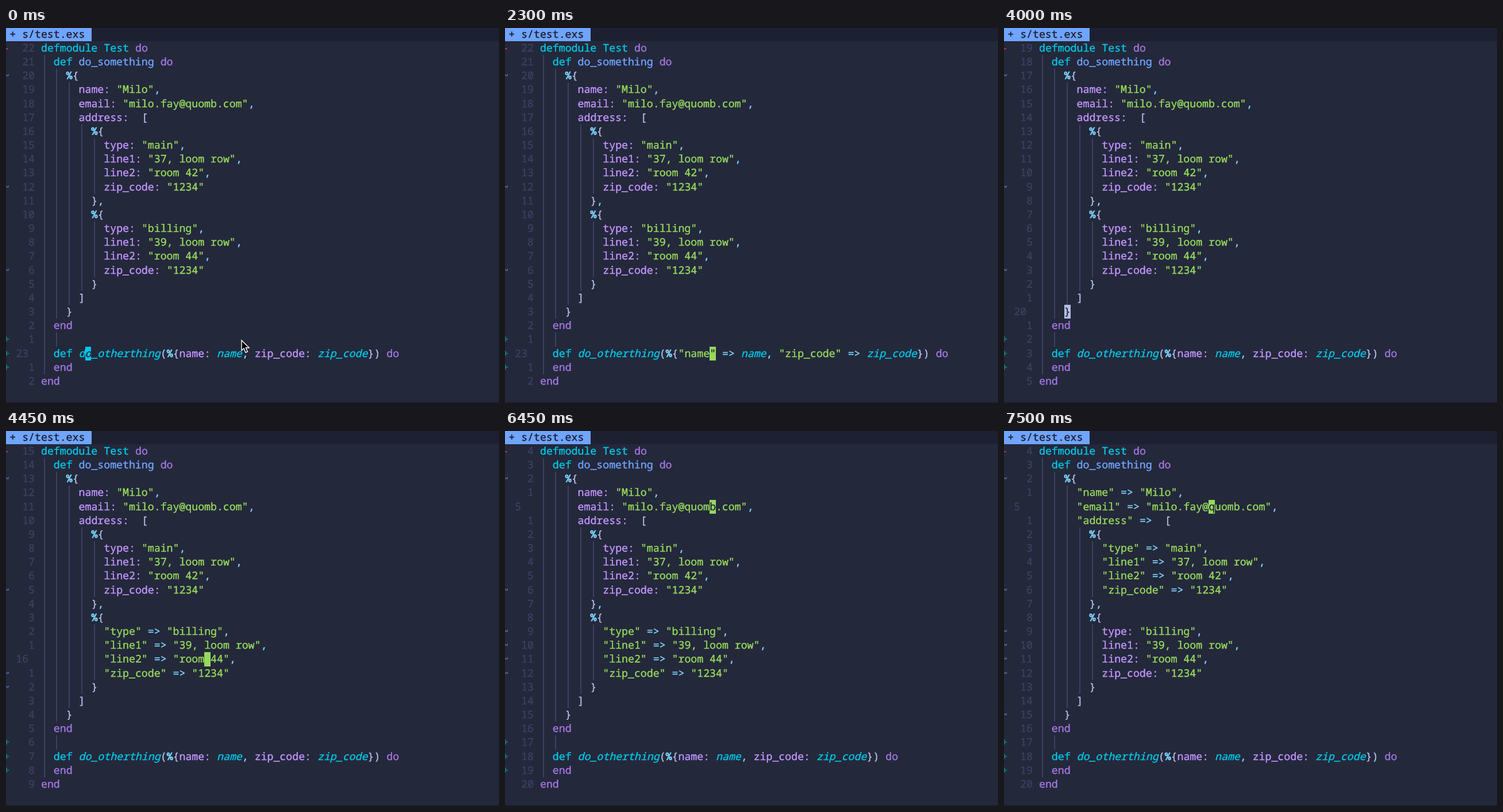
Recreate the animation shown at these times as an HTML page. Size 858x653 px, loop 8 s.

```html
<!DOCTYPE html>
<html lang="en">
<head>
<meta charset="utf-8">
<title>Map key toggle</title>
<style>
  html, body { margin: 0; width: 100%; height: 100%; overflow: hidden; background: #24283b; }
  #stage {
    position: absolute; left: 0; top: 0; width: 858px; height: 653px; overflow: hidden;
    font: 500 18.22px/24.16px "Noto Sans Mono", "DejaVu Sans Mono", monospace;
    text-rendering: geometricPrecision; font-variant-ligatures: none;
    -webkit-text-stroke: 0.4px;
  }
  #stage div { position: absolute; white-space: pre; }
  #bar { left: 0; top: 0; width: 100%; height: 23px; background: #1d2031; }
  #tab { left: 0; top: 0; width: 148.5px; height: 23px; background: #6fa4ff; }
  #foot { left: 0; bottom: 0; width: 100%; height: 2px; background: #1d2031; }
  #title { color: #1d2031; }
  .guide { width: 2px; height: 24.16px; background: #3b4162; }
  .num { color: #3b4162; }
  .add { color: #128079; }
  .mod { color: #4f78b0; }
  .del { color: #b9474f; }
  .def { color: #00c8e6; }
  .var { color: #00c8e6; font-style: italic; }
  .fn { color: #6fa4ff; }
  .kw { color: #a277e0; }
  .key { color: #c396ff; }
  .str { color: #96d95c; }
  .op { color: #7fd8ff; }
  .pct { color: #7fd8ff; font-weight: 700; }
  .pun { color: #b4bfe6; }
  #caret { background: currentColor; }
  #caret span { color: #24283b; }
  #caret .guide { background: #24283b; }
  #mouse { position: absolute; left: 408px; top: 542px; }
</style>
</head>
<body>
<div id="stage">
  <div id="bar"></div><div id="tab"></div><div id="foot"></div>
  <div id="title">+ s/test.exs</div>
  <div id="guides"></div>
  <div id="text"></div>
  <div id="caret"></div>
  <svg id="mouse" width="20" height="26" viewBox="0 0 20 26">
    <path d="M2 2V19.5L6 16L9 23L12.3 21.6L9.3 14.8H15Z" fill="#000" stroke="#fff" stroke-width="1.4"/>
  </svg>
</div>
<script>
const LOOP = 8000, TICK = 50, CW = 10.932, LH = 24.16, LEFT = 61, TOP = 23, GUIDE = 4.6;
const $ = id => document.getElementById(id);
const x = col => LEFT + col * CW;
const y = row => TOP + row * LH;

const CODE = `defmodule Test do
  def do_something do
    %{
      name: "Milo",
      email: "milo.fay@quomb.com",
      address:  [
        %{
          type: "main",
          line1: "37, loom row",
          line2: "room 42",
          zip_code: "1234"
        },
        %{
          type: "billing",
          line1: "39, loom row",
          line2: "room 44",
          zip_code: "1234"
        }
      ]
    }
  end

  def do_otherthing(%{name: name, zip_code: zip_code}) do
  end
end`.split("\n");

// key presses and key repeats, each a linear run
const COLS = [
  { at: 0, from: 7 },
  { at: 450, end: 700, from: 8, to: 10 },
  { at: 850, end: 1400, from: 12, to: 27 }
];
const ROWS = [
  { at: 0, from: 22 },
  { at: 3400, from: 21 },
  { at: 3900, end: 4250, from: 20, to: 15 },
  { at: 5400, end: 5500, from: 14, to: 13 },
  { at: 6150, end: 6450, from: 12, to: 4 },
  { at: 6600, from: 3 },
  { at: 6900, from: 4 }
];

// spans of rows with the time they hold
const QUOTED = [
  { rows: [22, 22], at: 2300, end: 2500 },
  { rows: [13, 16], at: 4450, end: 7500 },
  { rows: [3, 10], at: 7500 }
];
const CHANGED = [
  { rows: [2, 2], at: 0 },
  { rows: [10, 10], at: 0 },
  { rows: [16, 16], at: 0 },
  { rows: [17, 17], at: 4450, end: 5250 },
  { rows: [13, 15], at: 5250 },
  { rows: [19, 19], at: 7500 }
];

const RULES = [
  ["str", /^"/], ["key", /:$/], ["op", /^(=>|,)$/], ["pct", /^%$/], ["pun", /^[^\w]$/],
  ["kw", /^(do|end)$/], ["def", /^(def|defmodule|Test)$/], ["fn", /^do_something$/], ["var", /./]
];

function follow(runs, t) {
  const { at, end = at, from, to = from } = runs.filter(r => r.at <= t).pop();
  const p = end > at ? Math.min(1, (t - at) / (end - at)) : 1;
  return Math.round(from + (to - from) * p);
}

const within = (spans, row, t) => spans.some(({ rows: [a, b], at, end = LOOP }) =>
  row >= a && row <= b && t >= at && t < end);

const quote = line => line.replace(/(\w+): /g, '"$1" => ');
const tokens = line => [...line.matchAll(/"[^"]*"|\w+:|\w+|=>|[^\s\w]/g)].map(m => ({
  col: m.index, text: m[0], kind: RULES.find(r => r[1].test(m[0]))[0]
}));
const put = (col, row, kind, text) =>
  `<div class="${kind}" style="left:${x(col)}px;top:${y(row)}px">${text}</div>`;

function sign(r, t) {
  if (r === 0) return put(-6, r, "del", "-");
  if (r > 20 && r < 24) return put(-6, r, "add", "+");
  return within(CHANGED, r, t) ? put(-6, r, "mod", "~") : "";
}

function number(r, row) {
  const text = r === row ? String(r + 1) : String(Math.abs(r - row)).padStart(3);
  return put(-4, r, "num", text);
}

function caret(row, want, line) {
  const col = Math.max(0, Math.min(want, CODE[row].length - 1));
  const hit = tokens(line).find(k => col >= k.col && col < k.col + k.text.length);
  const box = $("caret");
  box.className = hit ? hit.kind : line ? "pun" : "num";
  box.style.cssText = `left:${x(col)}px;top:${y(row)}px;width:${CW}px;height:${LH}px`;
  box.innerHTML = line
    ? `<span>${line[col]}</span>`
    : `<div class="guide" style="left:${GUIDE}px;top:0"></div>`;
}

let last = -1;
function draw(time) {
  const t = Math.floor(time / TICK) * TICK;
  if (t === last) return;
  last = t;
  const row = follow(ROWS, t);
  const lines = CODE.map((line, r) => within(QUOTED, r, t) ? quote(line) : line);
  $("text").innerHTML = lines.map((line, r) => sign(r, t) + number(r, row) +
    tokens(line).map(k => put(k.col, r, k.kind, k.text)).join("")).join("");
  caret(row, follow(COLS, t), lines[row]);
  $("mouse").style.display = t < 450 ? "block" : "none";
}

// one guide for every two columns of indent; a blank line keeps the body's indent
function guides() {
  let html = "";
  CODE.forEach((line, r) => {
    const indent = line ? line.search(/\S/) : 4;
    for (let col = 0; col < indent; col += 2)
      html += `<div class="guide" style="left:${x(col) + GUIDE}px;top:${y(r)}px"></div>`;
  });
  return html;
}

$("title").style.cssText = `left:${x(-5)}px;top:${y(-1)}px`;
$("guides").innerHTML = guides();

const start = performance.now();
function tick() {
  draw((performance.now() - start) % LOOP);
  requestAnimationFrame(tick);
}
draw(0);
requestAnimationFrame(tick);
</script>
</body>
</html>
```
